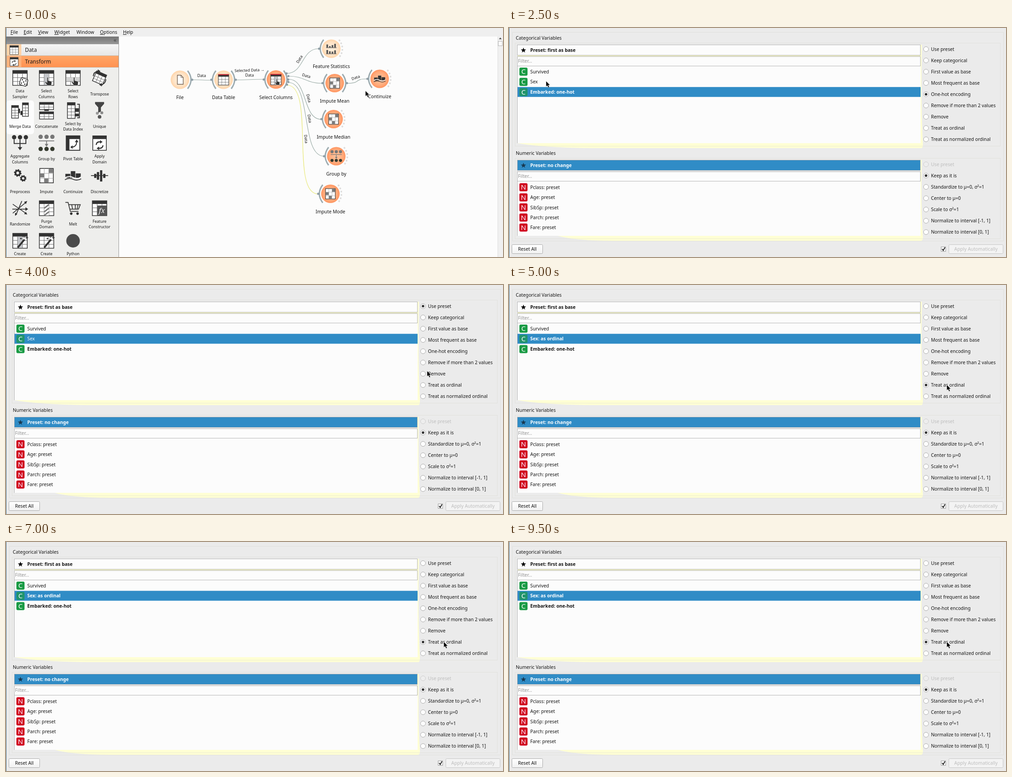
These frames come from a looping animation (1100x509 px, 10 s). An HTML page:

```html
<!DOCTYPE html>
<html lang="en">
<head>
<meta charset="utf-8">
<title>Continuize widget</title>
<style>
html, body { margin: 0; width: 100%; height: 100%; overflow: hidden; background: #ebebeb; }
svg { display: block; width: 1100px; height: 509px; }
text { font: 10.3px "Noto Sans", "Open Sans", sans-serif; fill: #151515; white-space: pre; }
.b { font-weight: 700; }
.m { text-anchor: middle; }
.s { font-size: 8.6px; }
.l { font-size: 11.9px; }
.c { font-size: 15px; fill: #fff; }
.w { fill: #fff; }
.g { fill: #929292; }
.off { fill: #bdbdbd; }
.u { text-decoration: underline; }
.dialog, .pick0, .pick1, .pick2, .haze, .cursor { animation: dialog 10s step-end infinite; }
.pick0 { animation-name: pick0; }
.pick1 { animation-name: pick1; }
.pick2 { animation-name: pick2; }
.haze { animation-name: haze; }
.cursor { animation-name: cursor; }
@keyframes dialog { 0% { opacity: 0; } 15%, 100% { opacity: 1; } }
@keyframes pick0 { 0% { opacity: 1; } 30%, 100% { opacity: 0; } }
@keyframes pick1 { 0% { opacity: 0; } 30% { opacity: 1; } 50%, 100% { opacity: 0; } }
@keyframes pick2 { 0% { opacity: 0; } 50%, 100% { opacity: 1; } }
@keyframes haze { 0% { opacity: 1; } 20%, 100% { opacity: 0; } }
@keyframes cursor {
  0% { transform: translate(795.5px, 139.5px); }
  5% { transform: translate(820px, 118px); }
  10% { transform: translate(835.5px, 107px); }
  20% { transform: translate(459px, 113px); }
  25% { transform: translate(82px, 118px); }
  35% { transform: translate(507px, 155px); }
  40% { transform: translate(932px, 191px); }
  45%, 100% { transform: translate(969px, 222px); }
}
</style>
</head>
<body>
<svg id="stage" viewBox="0 0 1100 509">
<defs>
  <radialGradient id="hot"><stop offset="0" stop-color="#ffc6a0"/><stop offset=".7" stop-color="#ffab7c"/><stop offset="1" stop-color="#ff9560"/></radialGradient>
  <radialGradient id="pale"><stop offset="0" stop-color="#fff2e0"/><stop offset=".7" stop-color="#ffe3c6"/><stop offset="1" stop-color="#ffd4a8"/></radialGradient>
  <linearGradient id="bar" x2="0" y2="1"><stop offset="0" stop-color="#757575"/><stop offset="1" stop-color="#989898"/></linearGradient>
  <linearGradient id="tab" x2="0" y2="1"><stop offset="0" stop-color="#f6f6f6"/><stop offset="1" stop-color="#e6e6e6"/></linearGradient>
  <linearGradient id="tabOn" x2="0" y2="1"><stop offset="0" stop-color="#ffa566"/><stop offset="1" stop-color="#ff9150"/></linearGradient>
  <linearGradient id="btn" x2="0" y2="1"><stop offset="0" stop-color="#fff"/><stop offset="1" stop-color="#f1f1f1"/></linearGradient>
</defs>
</svg>
<script>
const INK = '#333', BLUE = '#308cc6', HAZE = '#ffffd4';

const text = (x, y, s, cls = '', extra = '') => `<text x="${x}" y="${y}" class="${cls}" ${extra}>${s}</text>`;
const rect = (x, y, w, h, fill, extra = '') => `<rect x="${x}" y="${y}" width="${w}" height="${h}" fill="${fill}" ${extra}/>`;
const disc = (x, y, r, fill = INK, extra = '') => `<circle cx="${x}" cy="${y}" r="${r}" fill="${fill}" ${extra}/>`;
const line = (d, w = 1.8, color = INK, extra = '') => `<path d="${d}" fill="none" stroke="${color}" stroke-width="${w}" ${extra}/>`;
const area = (d, fill = INK, extra = '') => `<path d="${d}" fill="${fill}" ${extra}/>`;
const at = (x, y, s, more = '') => `<g transform="translate(${x} ${y}) ${more}">${s}</g>`;
const range = n => [...Array(n).keys()];
const box = (x, y, w, h, fill, stroke = '#b5b5b5', extra = '') => rect(x + .5, y + .5, w - 1, h - 1, fill, `stroke="${stroke}" ${extra}`);

// Icons are drawn around their own centre.
function table(w = 32, h = 33, cols = 3, rows = 3, head = 7) {
  const x = -w / 2, y = -h / 2, cw = w / cols, rh = (h - head) / rows;
  const v = range(cols - 1).map(i => `M${x + cw * (i + 1)} ${y + head}V${-y}`).join('');
  const r = range(rows - 1).map(i => `M${x} ${y + head + rh * (i + 1)}H${-x}`).join('');
  return rect(x, y, w, h, '#fff', `stroke="${INK}" stroke-width="1.5"`) + rect(x, y, w, head, INK) + line(v + r, 1, '#666');
}
const shade = rect(-5, -9, 10, 25, '#c3c5c9');
const hand = at(2, 4, area('M-1-6Q1-8 2-5V2L9 4Q12 5 11 9L10 15H0L-6 7Q-7 4-4 5L-1 8Z', INK, 'stroke="#fff" stroke-width=".7"'), 'scale(.85)');
const cycle = line('M-8 0Q-7-8 2-7M8 1Q7 9-2 8', 2.5) + area('M1-11L7-7L1-3ZM-1 4L-7 8L-1 12Z');
const trio = (y, fill = INK) => [-13, 0, 13].map(x => disc(x, y, 4.8, fill)).join('');
const wand = line('M-5 15L10-3', 4) + line('M9-14V-6M5-10H13M15-10V-4M12-7H18M2-7V-3M0-5H4', 1.3);
const gear = (x, y, r) => disc(x, y, r * .72, 'none', `stroke="${INK}" stroke-width="${r * .55}"`) +
  disc(x, y, r, 'none', `stroke="${INK}" stroke-width="${r * .4}" stroke-dasharray="${r * .4} ${r * .385}"`);
const cell = (x, y) => rect(x, y, 9, 9, '#7b7b7b');

const icons = {
  table: table(),
  red: table() + rect(-16, -17, 32, 2.5, '#e32636'),
  file: area('M-8-14H3L10-7V14H-8Z', '#fff', 'stroke="#5a4636" stroke-width="1.6"') + line('M3-14V-7H10', 1.3, '#5a4636'),
  sampler: table() + at(8, 9, rect(-8, -8, 16, 16, '#fff', `rx="3" stroke="${INK}" stroke-width="1.5"`) +
    [[-4, -4], [4, -4], [0, 0], [-4, 4], [4, 4]].map(p => disc(...p, 1.5)).join(''), 'rotate(18)'),
  columns: table() + shade + hand,
  selected: table() + shade + hand + rect(-16, -17, 32, 2.5, '#e32636'),
  rows: table() + rect(-15, -1, 30, 8, '#d2d2d2') + hand,
  transpose: at(0, 0, table(24, 24, 3, 3, 6), 'rotate(24)') + line('M-14-4Q-13-14-3-15M14 3Q13 13 4 15', 2) +
    area('M-4-19L2-15L-4-11ZM5 11L-1 15L5 19Z'),
  merge: at(-11, 3, table(15, 28, 2, 4, 5)) + at(12, -2, table(13, 30, 2, 4, 5)) + rect(-4, -4, 4, 10, INK) + rect(1, 1, 5, 9, INK),
  concat: at(0, -10, table(31, 16, 3, 2, 5)) + at(0, 11, table(31, 16, 3, 2, 5)) + rect(-5, -3, 10, 4, INK),
  index: at(-4, 0, table(17, 35, 2, 4, 6)) + rect(4, -5, 9, 8, INK) + rect(4, 7, 9, 6, INK) + line('M9-14H14V16H9', 2),
  unique: area('M-10-19H10V-15L3-7V2L-3 5V-7L-10-15Z', '#444') + disc(-5, 6, 3.2, '#999') + disc(5, 5, 3.2, '#888') + disc(0, 14, 4, '#555'),
  aggregate: trio(-13) + line('M-13-8V1H13V-8M0-8V12', 2) + area('M-5 9H5L0 16Z'),
  group: trio(-14, '#777') + line('M-17-5H17M0-5V5', 1.7, '#777') + area('M-4 2H4L0 8Z', '#777') + trio(13, '#353a2e'),
  pivot: rect(-15, -16, 30, 32, '#fff', `stroke="${INK}" stroke-width="2"`) + rect(-15, -16, 30, 7, INK) + rect(-15, -16, 7, 32, INK) +
    line('M-2 9Q8 8 8-3', 2) + area('M4-2L8-8L12-2ZM-1 5L-6 9L-1 13Z'),
  apply: rect(-15, -16, 30, 32, '#fff', `stroke="${INK}" stroke-width="1.6"`) + rect(-15, -16, 30, 7, INK) + at(0, 4, cycle, 'scale(.95)'),
  gears: gear(-5, -6, 7) + gear(7, 6, 6),
  impute: rect(-15, -16, 30, 32, '#fff', `stroke="${INK}" stroke-width="1.6"`) + cell(5, -15) + cell(-14, -5) + cell(-5, 6) +
    line('M-5-16V16M5-16V16M-15-5H15M-15 6H15', .9, '#999'),
  continuize: rect(-17, -4, 11, 9, INK) + rect(-5, -10, 10, 15, INK) + rect(6, -5, 11, 10, INK) +
    line('M-18 5Q-9-1 0 4T18 3', 2, '#fff') + line('M-18 9Q-9 4 0 8T18 7', 1.8),
  discretize: line('M-19 0H19', 1.8) + rect(-12, -4, 5, 9, INK) + rect(-6, -8, 5, 17, INK) + rect(1, -12, 5, 25, INK) + rect(8, -4, 5, 9, INK),
  randomize: line('M-16-9L14 12M-16 11L13-13M-17 2H15M4-16L-9 15', 1.7) + area('M16 14L9 13L13 8ZM16-16L9-14L13-9ZM18 2L12-2V6ZM-11 17L-11 10L-6 13Z'),
  purge: table() + rect(-5, -9, 10, 25, '#fff') + line('M-5 0L5-8M-5 8L5 0M-5 16L5 8', 3, '#777'),
  melt: line('M-17-13H-11L-6 7H12M-10-8H16L12 2H-7M-3-8L-1 2M5-8V2M11-8L9 2', 1.7) + disc(-4, 12, 2.8) + disc(10, 12, 2.8),
  feature: table() + rect(-5, -6, 21, 23, '#555') + `<text x="5" y="10" class="m w" style="font:italic 15px 'Noto Serif',serif">fx</text>`,
  create: table() + shade + wand,
  wand: table() + wand,
  dot: disc(0, 0, 15, '#4b4b4b'),
  stats: rect(-15, -13, 5, 9, '#555') + rect(-7, -8, 5, 4, '#555') + rect(1, -11, 5, 7, '#555') + rect(9, -15, 5, 11, '#555') +
    line('M-16-3H16M-16 16H16', 1.5, '#555') + rect(-15, 4, 5, 11, '#555') + rect(-7, 8, 5, 7, '#555') + rect(1, 9, 5, 6, '#555') + rect(9, 5, 5, 10, '#555')
};

const tools = [
  ['sampler', 'Data', 'Sampler'], ['columns', 'Select', 'Columns'], ['rows', 'Select', 'Rows'], ['transpose', 'Transpose'],
  ['merge', 'Merge Data'], ['concat', 'Concatenate'], ['index', 'Select by', 'Data Index'], ['unique', 'Unique'],
  ['aggregate', 'Aggregate', 'Columns'], ['group', 'Group by'], ['pivot', 'Pivot Table'], ['apply', 'Apply', 'Domain'],
  ['gears', 'Preprocess'], ['impute', 'Impute'], ['continuize', 'Continuize'], ['discretize', 'Discretize'],
  ['randomize', 'Randomize'], ['purge', 'Purge', 'Domain'], ['melt', 'Melt'], ['feature', 'Feature', 'Constructor'],
  ['create', 'Create', 'Class'], ['wand', 'Create', 'Instance'], ['dot', 'Python', 'Script']
];

function tool([icon, a, b], i) {
  const x = 31 + 58.7 * (i % 4), y = 72.4 * Math.floor(i / 4);
  return at(x, 111 + y, icons[icon]) + (b
    ? text(x, 143.3 + y, a, 'm s') + text(x, 155.8 + y, b, 'm s')
    : text(x, 149.5 + y, a, 'm s'));
}

function menu() {
  const items = [[10, 'File'], [39, 'Edit'], [71, 'View'], [107, 'Widget'], [156, 'Window'], [208, 'Options'], [259, 'Help']];
  return rect(0, 0, 1100, 19, '#efefef') + items.map(([x, s]) =>
    text(x, 13, s === 'Window' ? s : `<tspan class="u">${s[0]}</tspan>${s.slice(1)}`)).join('');
}

function sidebar() {
  return rect(0, 19, 250, 490, '#eeeeec') + rect(1, 19, 248, 17, 'url(#bar)') + text(238, 31, '«', '', 'style="fill:#444;font-size:13px"') +
    rect(1, 36, 248, 26, 'url(#tab)') + rect(1, 36, 33, 26, '#ffd3a8') + at(18, 49, icons.table, 'scale(.6)') + text(42, 53.3, 'Data', 'l') +
    rect(1, 62, 248, 26, 'url(#tabOn)') + rect(1, 62, 33, 26, '#ffb37c') + at(18, 75, icons.apply, 'scale(.6)') + text(42, 79.3, 'Transform', 'l') +
    line('M1 61.5H249M1 87.5H249', 1, '#c9b9a8') +
    rect(1, 161, 61, 75, '#fcfcfc', 'rx="6"') + tools.map(tool).join('') +
    line('M249.5 19V509', 1, '#999') + rect(0, 0, 1, 509, '#4c7892');
}

const arc = (side, dashed) => line(`M${side * 17}-20Q${side * 32} 0 ${side * 17} 20`, dashed ? 3.4 : 3,
  dashed ? '#dcdcdc' : '#9cabb0', dashed ? 'stroke-dasharray="3.5 4"' : '');

// ends: which sides carry a link
function node(x, y, label, icon, fill, ends) {
  const left = ends.includes('l'), right = ends.includes('r');
  return at(x, y, (left ? arc(-1) + disc(-27, 0, 2.5, '#8f9ea6') : '') + arc(1, !right) +
    (right ? disc(27, 0, 2.5, '#8f9ea6') : '') + disc(0, 0, 20.5, `url(#${fill})`) +
    at(0, 0, icons[icon], 'scale(.72)') + text(0, 43, label, 'm'));
}

// The bend of a link grows with its length.
function link(x1, y1, x2, y2, color = '#9aaba6') {
  const bend = 25 + .15 * Math.hypot(x2 - x1, y2 - y1);
  return line(`M${x1} ${y1}C${x1 + bend} ${y1} ${x2 - bend} ${y2} ${x2} ${y2}`, 1.2, color);
}

function canvas() {
  const links = [[412, 115, 455, 116], [508, 115.5, 570, 114], [621, 101, 692, 46], [625, 107, 700, 123],
    [626, 114, 698, 203], [625, 121, 704, 285], [755, 123, 800, 113], [622, 127, 691, 369, '#e9e97c']];
  const tags = [[433, 109, 0], [539, 108, 0], [652, 71, -58], [664, 109, 15], [775, 113, -20], [667, 157, 76], [669, 202, 80], [661, 247, 84]];
  const ports = [[621, 101], [625, 107], [625, 120], [622, 126]];
  return rect(250, 19, 838, 490, '#fcfcfc') + rect(1088, 19, 12, 490, '#f0f0f0') + line('M1088.5 19V509', 1, '#ddd') +
    area('M1091 25L1094 21L1097 25Z', '#555') + box(1089, 29, 10, 11, '#fafafa') +
    links.map(l => link(...l)).join('') +
    node(385, 115, 'File', 'file', 'pale', 'r') + node(481.5, 115, 'Data Table', 'red', 'pale', 'lr') +
    node(597.5, 114.5, 'Select Columns', 'selected', 'hot', 'lr') + node(720, 46, 'Feature Statistics', 'stats', 'pale', 'l') +
    node(727.5, 122.5, 'Impute Mean', 'impute', 'hot', 'lr') + node(827, 113, 'Continuize', 'continuize', 'hot', 'l') +
    node(725, 202.5, 'Impute Median', 'impute', 'hot', 'l') + node(731, 285, 'Group by', 'group', 'hot', 'l') +
    node(718, 368.5, 'Impute Mode', 'impute', 'hot', 'l') +
    ports.map(p => disc(...p, 2.4, '#8f9ea6')).join('') +
    tags.map(([x, y, a]) => at(x, y, text(0, 0, 'Data', 'm s'), `rotate(${a})`)).join('') +
    at(506, 98, text(0, 0, 'Selected Data →', 's'), 'rotate(-2)');
}

const star = (y, fill) => area('M0-6L1.5-1.9L5.8-1.8L2.4.9L3.6 5L0 2.6L-3.6 5L-2.4.9L-5.8-1.8L-1.5-1.9Z', fill, `transform="translate(32 ${y})"`);
const badge = (y, c, fill) => rect(23, y - 9, 18, 18, fill, 'rx="3"') + text(32, y + 5.4, c, 'c m');
const radio = (y, label, off) => disc(923, y, 5.5, off ? '#eee' : '#fdfdfd', `stroke="${off ? '#ccc' : '#a9a9a9'}"`) + text(934, y + 3.8, label, off ? 'off' : '');
const mark = y => disc(923, y, 2.8, '#303030');

function pick(i, row, labels, on) {
  const rows = labels.map((s, n) => {
    const y = 97 + 22.7 * n, hit = n === row;
    return (hit ? rect(19, y - 11.2, 892, 22, BLUE) : '') + badge(y, 'C', hit ? '#21946c' : '#1a9b45') +
      text(47, y + 3.7, s, (s.includes(':') ? 'b ' : '') + (hit ? 'w' : ''));
  });
  return `<g class="pick${i}">${rows.join('')}${mark(47 + 25.05 * on)}</g>`;
}

function lists(y, h, title, preset, chosen) {
  return text(15, y - 11.5, title) + box(13, y - 4, 1075, h + 10, 'none', '#d6d6cf', 'stroke-dasharray="1 1"') +
    box(18, y, 893, 24, chosen ? BLUE : '#fcfcfc') + star(y + 12.5, chosen ? '#183850' : '#000') +
    text(47, y + 16.2, preset, chosen ? 'b w' : 'b') +
    rect(18, y + 47, 893, h - 48, '#fcfcfc') + line(`M18.5 ${y + 47}V${y + h - 1}`, 1, '#b5b5b5') +
    box(18, y + 26, 893, 22, '#fcfcfc') + text(20, y + 40.3, 'Filter...', 'g');
}

function dialog() {
  const modes = ['Use preset', 'Keep categorical', 'First value as base', 'Most frequent as base', 'One-hot encoding',
    'Remove if more than 2 values', 'Remove', 'Treat as ordinal', 'Treat as normalized ordinal'];
  const scales = ['Use preset', 'Keep as it is', 'Standardize to μ=0, σ²=1', 'Center to μ=0', 'Scale to σ²=1',
    'Normalize to interval [-1, 1]', 'Normalize to interval [0, 1]'];
  const numbers = ['Pclass', 'Age', 'SibSp', 'Parch', 'Fare'];
  return rect(0, 0, 1100, 509, '#ebebeb') +
    area('M0 0H1100V58L960 35Q810 18 785 18Q770 18 765 38H440Q330 30 260 20Q130 8 0 10Z', '#fcfce0', 'class="haze"') +
    area('M18 256Q80 266 180 267H912Q917 267 916 255Q911 160 914 37H910V256Z', HAZE) +
    area('M108 462Q150 473 230 473H911Q917 473 916 464Q911 390 914 293H910V462Z', HAZE) +
    box(7, 9, 1088, 465, 'none', '#d4d4cc', 'stroke-dasharray="1 1"') +
    lists(37, 220, 'Categorical Variables', 'Preset: first as base') +
    lists(293, 170, 'Numeric Variables', 'Preset: no change', true) +
    line('M19 61.8H911', 1.4, '#f4f4b8') +
    modes.map((s, i) => radio(47 + 25.05 * i, s)).join('') +
    scales.map((s, i) => radio(303 + 25.1 * i, s, !i)).join('') + mark(328.1) +
    numbers.map((s, i) => badge(354 + 22.4 * i, 'N', '#d0021f') + text(47, 357.7 + 22.4 * i, s + ': preset')).join('') +
    pick(0, 2, ['Survived', 'Sex', 'Embarked: one-hot'], 4) +
    pick(1, 1, ['Survived', 'Sex', 'Embarked: one-hot'], 0) +
    pick(2, 1, ['Survived', 'Sex: as ordinal', 'Embarked: one-hot'], 7) +
    box(6, 481, 69, 21, 'url(#btn)', '#aaa', 'rx="2"') + text(40.5, 495.3, 'Reset All', 'm') +
    box(956, 486, 11, 11, '#fff', '#999') + line('M958.5 491L961 494.5L965 487.5', 2, '#222') +
    box(973, 481, 121, 21, '#f3f3f3', '#c6c6c6', 'rx="2"') + text(1033.5, 495.3, 'Apply Automatically', 'm off') +
    rect(0, 0, 1, 509, '#4c7892');
}

const cursor = area('M0 0V12.2L2.8 9.8L5 14.4L7.2 13.4L5 8.9H8.8Z', '#000', 'class="cursor" stroke="#fff" stroke-width=".5"');

document.getElementById('stage').insertAdjacentHTML('beforeend',
  menu() + canvas() + sidebar() + `<g class="dialog">${dialog()}</g>` + cursor);
</script>
</body>
</html>
```
